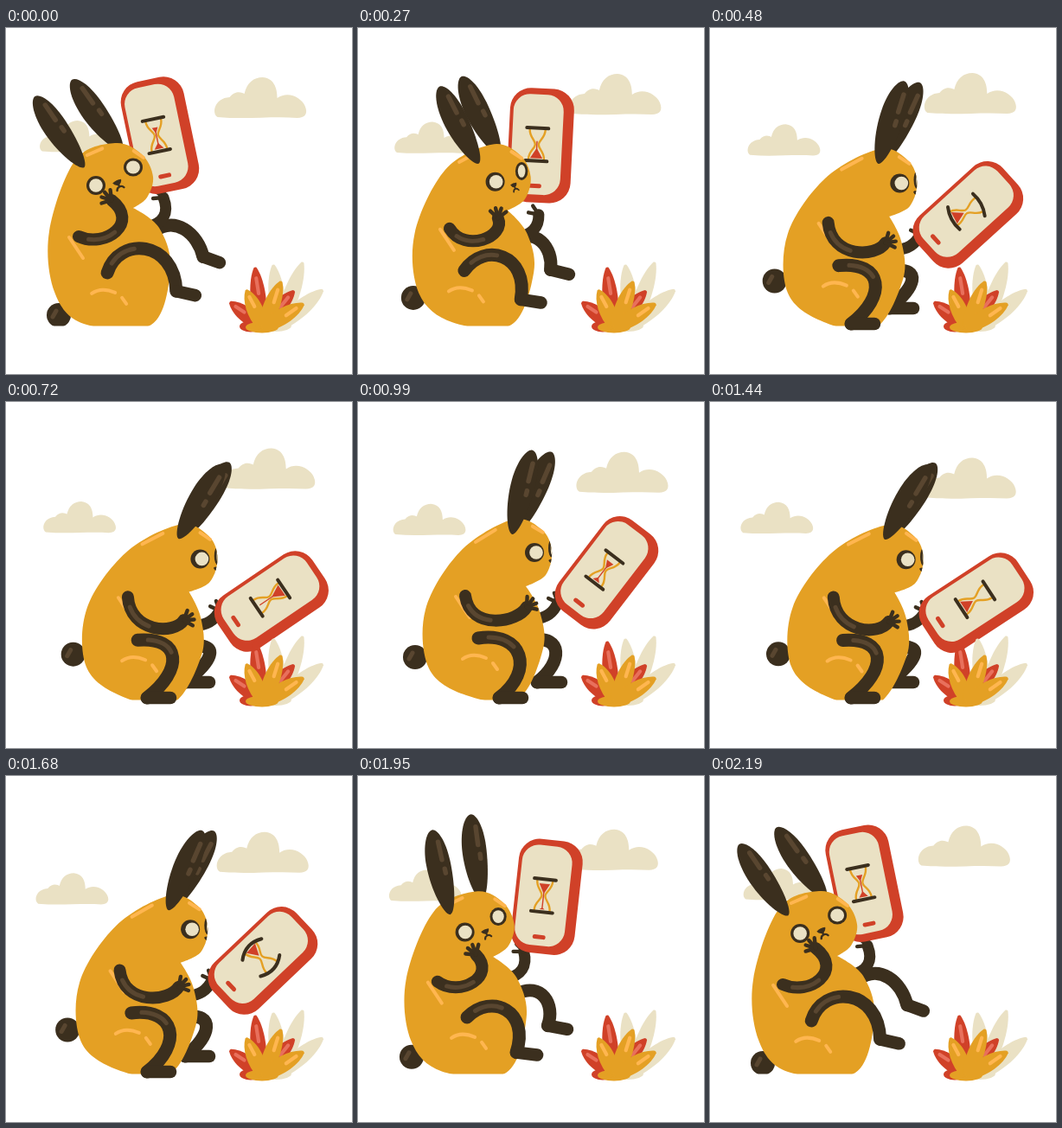
These frames come from a looping animation (400x400 px, 2.22 s). An HTML page:

```html
<!DOCTYPE html>
<html lang="en">
<head>
<meta charset="utf-8">
<title>Rabbit waiting for a phone</title>
<style>
html, body { margin: 0; width: 100%; height: 100%; overflow: hidden; background: #fff; }
svg { display: block; width: 100%; height: 100%; }
</style>
</head>
<body>
<svg id="stage" viewBox="0 0 400 400" xmlns="http://www.w3.org/2000/svg"></svg>
<script>
const LOOP = 2220, STEP = 30, TURN = LOOP / 2;
const ORANGE = '#e4a024', GLOW = '#ffb650', DARK = '#3b2f1e', SHEEN = '#594630';
const RED = '#d04128', PINK = '#e8705c', CREAM = '#eae1c4';

// Key points of each part: fallen back, then sitting upright
const RIG = {
  body: [
    [126,133, 157,146, 170,172, 163,196, 147,208, 177,231, 190,278, 168,343, 90,342, 56,305, 50,235, 80,153],
    [178,136, 212,147, 224,172, 217,200, 194,213, 210,242, 214,285, 185,343, 125,339, 82,308, 78,240, 118,173]
  ],
  face: [[104,182, 147,161, 129,179], [204,174, 224,169, 223,184]],
  ears: [[88,158, 132,138], [179,149, 186,146]],
  tail: [[61,332], [66,295]],
  nearArm: [[84,241, 115,255, 155,225, 122,199], [124,224, 130,265, 185,255, 195,237]],
  farArm: [[163,230, 182,226, 189,214, 182,196], [204,251, 217,250, 226,244, 231,232]],
  nearLeg: [[117,283, 130,240, 195,245, 197,304, 219,309], [139,273, 190,265, 205,310, 163,342, 190,342]],
  farLeg: [[170,236, 195,215, 222,238, 228,264, 247,271], [203,275, 235,270, 238,300, 207,324, 235,324]],
  phone: [[177.5,124], [287,196.5]]
};

// Time and value pairs, eased from one to the next
const LEAN = [[0, 0], [90, -.06], [420, 1], [1680, 1], [2050, .02], [LOOP, 0]];
const BEND = [[0, 0], [240, 0], [640, 1], [990, 0], [1380, 1], [1900, 0], [LOOP, 0]];

const clamp = v => Math.min(1, Math.max(0, v));
const smooth = u => u * u * (3 - 2 * u);
const lerp = (a, b, k) => a + (b - a) * k;
const mix = (p, q, k) => [lerp(p[0], q[0], k), lerp(p[1], q[1], k)];
const shift = (p, x, y) => [p[0] + x, p[1] + y];
const fix = n => +n.toFixed(2);

function track(keys, time) {
  const t = (time + LOOP) % LOOP;
  const i = keys.findIndex(k => k[0] > t);
  const [t0, a] = keys[i - 1], [t1, b] = keys[i];
  return lerp(a, b, smooth((t - t0) / (t1 - t0)));
}

function pose(part, lean) {
  const [back, sit] = RIG[part], pts = [];
  for (let i = 0; i < back.length; i += 2) {
    pts.push(mix([back[i], back[i + 1]], [sit[i], sit[i + 1]], lean));
  }
  return pts;
}

// Tips the torso forward over the feet
function tip([x, y], bend) {
  const a = .087 * bend, dx = x - 135, dy = y - 344;
  return [135 + dx * Math.cos(a) - dy * Math.sin(a) + 9 * bend,
    344 + dx * Math.sin(a) + dy * Math.cos(a) + 2 * bend];
}

const fill = (d, color, extra = '') => `<path d="${d}" fill="${color}" ${extra}/>`;
const line = (d, color, width, extra = '') =>
  `<path d="${d}" fill="none" stroke="${color}" stroke-width="${width}" stroke-linecap="round" stroke-linejoin="round" ${extra}/>`;
const oval = (x, y, rx, ry, color) =>
  `<ellipse cx="${fix(x)}" cy="${fix(y)}" rx="${fix(rx)}" ry="${fix(ry)}" fill="${color}"/>`;
const slab = (x, y, w, h, r, color) =>
  `<rect x="${x - w / 2}" y="${y - h / 2}" width="${w}" height="${h}" rx="${r}" fill="${color}"/>`;
const seg = (a, b) => `M${a.map(fix)}L${b.map(fix)}`;
const place = ([x, y], turn, inside, scale = '1') =>
  `<g transform="translate(${fix(x)} ${fix(y)}) rotate(${fix(turn)}) scale(${scale})">${inside}</g>`;
const clip = (id, inside) => `<g clip-path="url(#${id})">${inside}</g>`;

// Smooth closed outline with one sharp corner
function outline(pts, corner) {
  const n = pts.length, at = i => pts[(i + n) % n];
  const pull = (i, sign) => at(i).map((v, k) =>
    fix(i % n === corner ? v : v + sign * (at(i + 1)[k] - at(i - 1)[k]) / 6));
  return 'M' + pts[0].map(fix)
    + pts.map((p, i) => `C${pull(i, 1)} ${pull(i + 1, -1)} ${at(i + 1).map(fix)}`).join('') + 'Z';
}

function cloud(x, y, sx, sy) {
  const d = 'M4 46C-3 42 0 24 18 23C25 14 33 18 35 19C38 6 46 0 56 0C69 1 73 12 73 24C86 15 101 24 105 33C109 42 105 47 96 47C66 45 36 49 4 46Z';
  return place([x, y], 0, fill(d, CREAM), `${sx} ${sy}`);
}

function leaf(root, end, w, color, shine) {
  const dx = end[0] - root[0], dy = end[1] - root[1], len = Math.hypot(dx, dy);
  const d = `M0 ${-w * .6}C${len * .4} ${-w * 1.3} ${len * .8} ${-w} ${len} -1.5Q${len + 1} 0 ${len} 1.5C${len * .8} ${w} ${len * .4} ${w * 1.3} 0 ${w * .6}Z`;
  return place(root, Math.atan2(dy, dx) * 180 / Math.PI,
    fill(d, color) + (shine ? line(`M${len * .56} 1L${len * .82} 0`, shine, 4.2) : ''));
}

const fan = (root, ends, w, color, shine) => ends.map(e => leaf(root, e, w, color, shine)).join('');
const PLANT = oval(312, 344, 18, 7, CREAM)
  + fan([317, 344], [[309, 274], [343, 271], [366, 303]], 9.5, CREAM)
  + oval(283, 345, 13, 6.5, RED)
  + fan([295, 345], [[288, 277], [259, 317], [333, 304]], 9, RED, PINK)
  + oval(296, 346, 19, 6.5, ORANGE)
  + fan([297, 347], [[278, 303], [318, 293], [344, 319]], 9.5, ORANGE, GLOW);

function ear(base, turn) {
  const d = 'M0 4C-7 3 -16 -28 -15 -57C-14 -82 -6 -96 0 -96C6 -96 13 -82 13 -57C13 -28 7 3 0 4Z';
  return place(base, turn, fill(d, DARK) + line('M4 -60V-81M5 -44V-49', SHEEN, 5.5));
}

function limb(pts, width, shine) {
  const [a, b, c, d] = pts.map(p => p.map(fix));
  const path = `M${a}C${b} ${c} ${d}`;
  return line(path, DARK, width)
    + (shine ? line(path, SHEEN, 5, 'stroke-dasharray="32 500" stroke-dashoffset="-12"') : '');
}

function hand(wrist, angle, spread) {
  return spread.map(s => {
    const a = (angle + s) * Math.PI / 180;
    return line(seg(wrist, shift(wrist, 12 * Math.cos(a), 12 * Math.sin(a))), DARK, 4.4);
  }).join('');
}

// The hip follows the torso while the foot stays put
function leg(part, lean, bend, shine) {
  const pts = pose(part, lean).map((p, i) => i < 2 ? tip(p, bend) : p);
  return limb(pts, 15, shine) + line(seg(pts[3], pts[4]), DARK, 14.5);
}

function hourglass(t) {
  const p = t % TURN, u = clamp((p - 430) / 290);
  const spin = u < 1 ? 180 * smooth(u) : 0;
  const run = clamp((p - 720 + (p < 720 ? TURN : 0)) / 720);
  const swing = Math.sin(Math.PI * u), w = 12.5 + 4 * swing;
  const cap = s => line(`M${-w} ${s * (19 - 5 * swing)}Q0 ${s * (19 + 6 * swing)} ${w} ${s * (19 - 5 * swing)}`, DARK, 4);
  const side = s => `M${s * 9} -17C${s * 9} -8 ${s * 2} -5 ${s * 2} 0C${s * 2} 5 ${s * 9} 8 ${s * 9} 17`;
  const pile = 7.5 * Math.sqrt(run), rest = 7.5 * (1 - run);
  const top = -3 - 13 * (1 - run);
  return place([0, 0], spin,
    fill(`M${-pile} 16L0 ${16 - 13 * run}L${pile} 16Z`, RED)
    + fill(`M${-rest} ${top}L${rest} ${top}L0 -2Z`, RED)
    + (run < 1 ? line('M0 -3V14', RED, 1.4) : '')
    + line(side(1) + side(-1), ORANGE, 2.4) + cap(1) + cap(-1));
}

function phone(t, lean, bend) {
  const [x, y] = pose('phone', lean)[0];
  const arc = 48 * lean * (1 - lean);
  return place([x + 21 * bend, y + 36 * bend - arc], lerp(-12, 37, lean) + 20 * bend,
    slab(0, 0, 74, 132, 24, RED)
    + place([-4, -1], 0, slab(0, 0, 58, 116, 19, CREAM) + line('M-5 48H5', RED, 5) + hourglass(t)));
}

function face([near, far, nose], lean) {
  const tilt = Math.atan2(far[1] - near[1], far[0] - near[0]) * 180 / Math.PI;
  const rx = lerp(11, 4, lean);
  return oval(...near, 11, 11, DARK) + oval(near[0] + 2 * lean, near[1], 7.8, 7.8, CREAM)
    + oval(...far, rx, 10.5, DARK) + oval(...far, rx * .96 - 2.6, 7.4, CREAM)
    + place(nose, tilt,
      fill('M-5 -2Q0 -4 5 -2Q4 2 0 3Q-4 2 -5 -2Z', DARK) + line('M0 1V5M-4 8Q-3 5 0 5Q3 5 4 8', DARK, 2.2),
      `${fix(lerp(1.1, .5, lean))} ${fix(lerp(1, .8, lean))}`);
}

function glow(body, shoulder, hip) {
  const [top, brow, cheek] = body, nape = body[11];
  const [x, y] = shift(hip, -18, 24).map(fix);
  return line(seg(mix(nape, top, .3), mix(nape, top, .68))
    + seg(mix(top, brow, .7), mix(brow, cheek, .15))
    + seg(shift(shoulder, -11, 1), shift(shoulder, 5, 25))
    + `M${x} ${y}q11 -8 27 -1m8 6l5 7`, GLOW, 4);
}

function draw(t) {
  const lean = lag => track(LEAN, t - lag), bend = lag => track(BEND, t - lag);
  const L = lean(0), B = bend(0), sway = 2 * Math.PI * t / LOOP;
  const torso = part => pose(part, L).map(p => tip(p, B));
  const body = torso('body'), shape = outline(body, 4);
  const [nearBase, farBase] = torso('ears');
  const tail = torso('tail')[0];
  const arm = torso('nearArm').map((p, i) => i < 2 ? p : shift(p, -6 * B, 10 * B));
  const reach = torso('farArm');
  const hip = tip(pose('nearLeg', lean(60))[0], B);
  return `<clipPath id="ground"><path d="M0 0H400V344.5H0Z"/></clipPath><clipPath id="skin"><path d="${shape}"/></clipPath>`
    + cloud(38.7 + 4.6 * Math.sin(sway), 112.5 - 5.5 * Math.cos(sway), .79, .77)
    + cloud(246 - 6 * Math.cos(sway + .44), 58.5 - 6.5 * Math.sin(sway + .24), 1, 1)
    + leg('farLeg', lean(60), B, false)
    + limb(reach, 13, false) + hand(reach[3], lerp(-160, -130, L), [-25, 20])
    + phone(t, lean(50), bend(30))
    + PLANT
    + ear(farBase, lerp(-36, 22, lean(80)) + 9 * bend(80))
    + clip('ground', oval(...tail, 14, 14, DARK)
      + line(seg(shift(tail, -7, 2), shift(tail, -3, -5)), SHEEN, 5)
      + fill(shape, ORANGE))
    + glow(body, arm[0], hip)
    + ear(nearBase, lerp(-35, 11, lean(80)) + 20 * bend(80))
    + clip('skin', face(torso('face'), L))
    + leg('nearLeg', lean(60), B, true)
    + limb(arm, 14, true) + hand(arm[3], lerp(-145, -35, L) + 20 * B, [-52, -18, 14, 48]);
}

const stage = document.getElementById('stage');
const start = performance.now();
function tick() {
  const t = (performance.now() - start) % LOOP;
  stage.innerHTML = draw(Math.floor(t / STEP) * STEP);
  requestAnimationFrame(tick);
}
tick();
</script>
</body>
</html>
```
